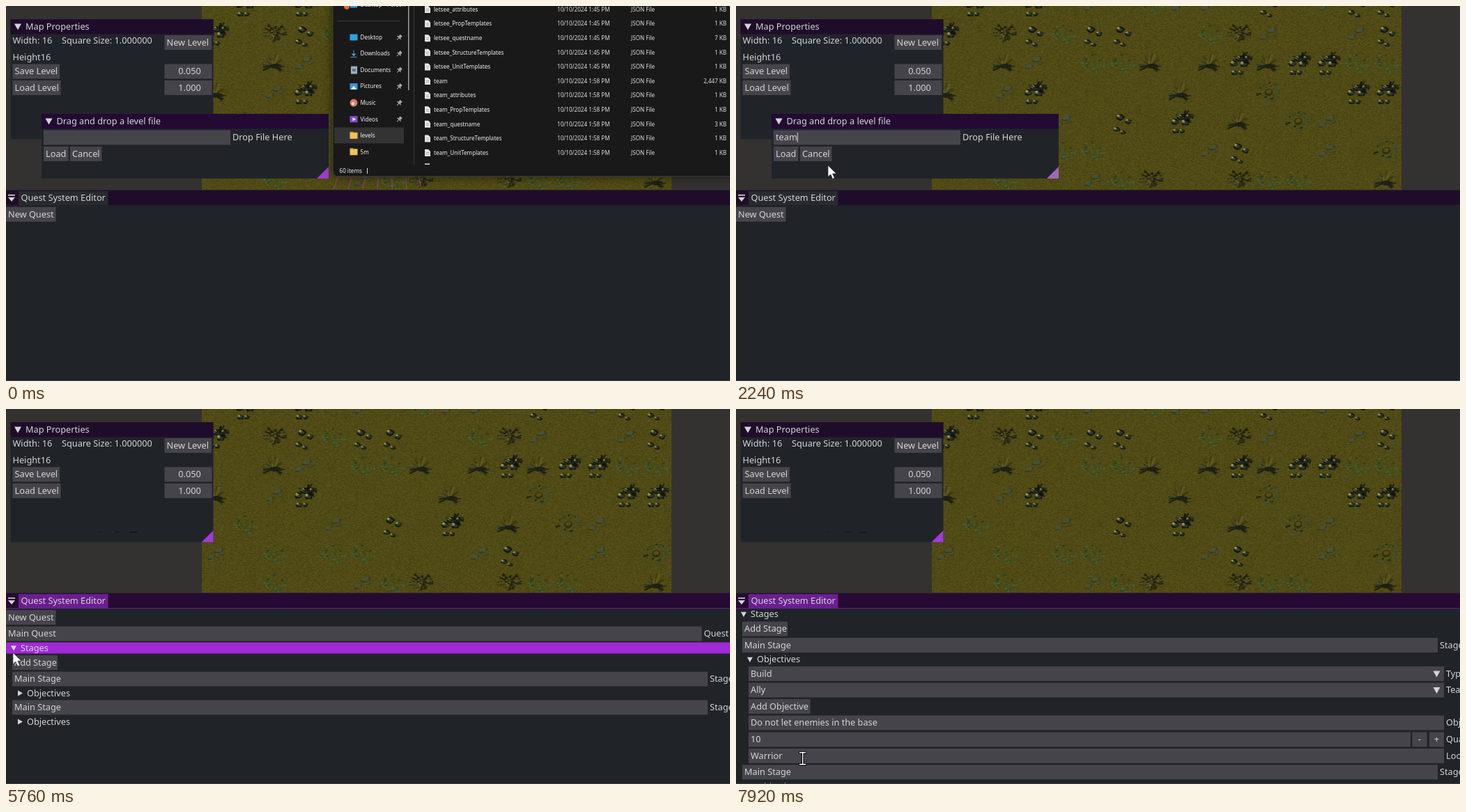
These frames come from a looping animation (1039 px wide and 539 px high, 7990 ms). An HTML page with a canvas:

```html
<!DOCTYPE html>
<html lang="en">
<head>
<meta charset="utf-8">
<title>Level editor</title>
<style>
html, body { margin: 0; width: 100%; height: 100%; overflow: hidden; background: #333230; }
canvas { display: block; }
</style>
</head>
<body>
<canvas id="stage" width="1039" height="539"></canvas>
<script>
const W = 1039, H = 539, LOOP = 7990;
const ctx = document.getElementById('stage').getContext('2d');
const UI_FONT = '12.74px "Noto Sans", "Open Sans", sans-serif';
const FILE_FONT = '8.1px "Noto Sans", "Open Sans", sans-serif';
const FRAME = '#46444b', BODY = '#202429', INK = '#d4d4d5';
const HOT = '#6d1c99', HEADER = '#a02ad6', GRIP = '#a23ad6';

// ---------- helpers ----------
let seed = 1;
const rnd = () => (seed = (seed * 16807) % 2147483647) / 2147483647;
const clamp = v => Math.max(0, Math.min(1, v));

function rect(x, y, w, h, color, c = ctx) {
  c.fillStyle = color;
  c.fillRect(x, y, w, h);
}
function poly(color, pts, c = ctx) {
  c.fillStyle = color;
  c.beginPath();
  for (let i = 0; i < pts.length; i += 2) c.lineTo(pts[i], pts[i + 1]);
  c.closePath();
  c.fill();
}
function blob(x, y, rx, ry, color, c = ctx) {
  c.fillStyle = color;
  c.beginPath();
  c.ellipse(x, y, rx, ry, -0.35, 0, 7);
  c.fill();
}
// text is placed by its left edge and vertical middle
function text(s, x, mid, color = INK, font = UI_FONT, align = 'left') {
  ctx.font = font;
  ctx.textAlign = align;
  ctx.fillStyle = color;
  ctx.fillText(s, x, Math.round(mid + parseFloat(font) * 0.34));
}

// ---------- terrain ----------
const TILE = 42.1, MAP_X = 280.5;
const MAP = [
  '.R.R.p.gpp.r.prr',
  'R.Drgrr..gDp..pr',
  '..Sp.ggS.SRSRRgg',
  'S.pR....S..c..RR',
  '.g..p.r.R.S.cp..',
  'p.g.gg...pr..p.c',
  '..g..pgD..Dgg..S'
];

function jagged(c, x, y, rx, ry, color) {
  const pts = [];
  for (let a = 0; a < 6.2; a += 0.75) {
    const d = 0.65 + rnd() * 0.5;
    pts.push(x + Math.cos(a) * rx * d, y + Math.sin(a) * ry * d);
  }
  poly(color, pts, c);
}
function rock(c, x, y, r) {
  jagged(c, x + 1, y + 1, r * 1.3, r, '#14170e');
  jagged(c, x + r * 0.3, y + r * 0.2, r * 0.8, r * 0.55, '#263b39');
  jagged(c, x - r * 0.3, y - r * 0.2, r * 0.6, r * 0.5, '#6d6834');
  jagged(c, x - r * 0.3, y - r * 0.3, r * 0.35, r * 0.3, '#b0a454');
}
function specks(c, n, rx, ry, colors, hollow = 0) {
  for (let i = 0; i < n; i++) {
    const a = rnd() * 6.28, d = hollow + (1 - hollow) * Math.sqrt(rnd());
    const s = 0.5 + rnd();
    blob(Math.cos(a) * d * rx, Math.sin(a) * d * ry, s * 1.4, s, colors[i % colors.length], c);
  }
}
// short strokes fanning out of one foot point
function fan(c, n, x, y, from, to, len, colors) {
  c.lineWidth = 1.5;
  for (let i = 0; i < n; i++) {
    const a = from + (to - from) * rnd(), d = len * (0.4 + 0.6 * rnd());
    c.strokeStyle = colors[i % colors.length];
    c.beginPath();
    c.moveTo(x + Math.cos(a) * 3, y + Math.sin(a) * 2);
    c.lineTo(x + Math.cos(a) * d, y + Math.sin(a) * d);
    c.stroke();
  }
}
const SPRITES = {
  R(c) {
    c.save();
    c.translate(3, -5);
    specks(c, 30, 15, 9, ['#14170f', '#1d2a25', '#2c3c32']);
    c.restore();
    rock(c, 0, -7, 5); rock(c, 10, -8, 4); rock(c, -9, 0, 5);
    rock(c, 5, 1, 5); rock(c, -8, 13, 4); rock(c, 1, 13, 3);
    fan(c, 14, 4, -4, -3.4, 0.6, 16, ['#12140d', '#1d2118']);
  },
  r(c) { rock(c, -4, -7, 5); rock(c, 8, -1, 4); rock(c, -9, 11, 4); rock(c, 0, 15, 3); },
  S(c) {
    fan(c, 26, -2, 4, -2.6, -0.3, 18, ['#6a602a', '#34330f', '#5a5122', '#453f17']);
    fan(c, 16, -3, 4, -0.1, 0.7, 19, ['#171b10', '#2a3526', '#22240f']);
    fan(c, 10, -2, 4, 2.7, 3.8, 17, ['#1a1d10', '#37360f', '#2b3a2e']);
    jagged(c, -1, 4, 8, 4, '#1d2113');
  },
  D(c) {
    specks(c, 50, 17, 14, ['#1e200f', '#2f2e12', '#5d5523', '#3b3815']);
    fan(c, 18, 0, -2, 0, 6.28, 16, ['#1b1d0e', '#28280f']);
    specks(c, 14, 11, 8, ['#6a602a', '#2c3f35']);
  },
  g(c) { specks(c, 42, 17, 15, ['#2c4f25', '#333c14', '#356447', '#4a6028']); },
  p(c) {
    for (const [x, y, r] of [[4, -5, 7], [-7, 5, 6], [9, 1, 3]]) {
      blob(x, y, r, r * 0.55, '#303a27', c);
      blob(x - 0.6, y - 0.8, r * 0.8, r * 0.38, '#4f5128', c);
      blob(x + 2, y + 1, r * 0.4, r * 0.2, '#365450', c);
    }
  },
  c(c) {
    specks(c, 52, 17, 14, ['#1e2210', '#2f4a28', '#3a5643', '#4c4a1d'], 0.5);
    blob(0, 0, 6, 5, '#2c2e11', c);
    blob(0, -1, 4, 3, '#544d1b', c);
  }
};

function makeTerrain() {
  const cv = document.createElement('canvas');
  cv.width = 674;
  cv.height = 264;
  const c = cv.getContext('2d');
  const img = c.createImageData(674, 264), d = img.data;
  for (let i = 0; i < d.length; i += 4) {
    const n = (rnd() + rnd() - 1) * 16;
    d[i] = 80 + n;
    d[i + 1] = 74 + n;
    d[i + 2] = 22 + n * 0.5;
    d[i + 3] = 255;
  }
  c.putImageData(img, 0, 0);
  MAP.forEach((line, row) => [...line].forEach((k, col) => {
    if (k === '.') return;
    seed = k.charCodeAt(0) * 977;
    c.save();
    c.translate((col + 0.5) * TILE, row * 42 - 2);
    SPRITES[k](c);
    c.restore();
  }));
  return cv;
}
const terrain = makeTerrain();

// ---------- pointer ----------
const PATH = [
  [230, 1050, -20], [400, 640, 110], [560, 230, 172], [710, 124, 181], [800, 124, 181],
  [850, 137, 185], [1050, 137, 185], [1110, 128, 212], [1180, 132, 229], [2980, 132, 229],
  [3400, 84, 212], [3540, 80, 213], [4060, 80, 213], [4400, 45, 290], [4680, 13, 356],
  [4880, 8, 344], [4950, 8, 346], [5430, 8, 346], [5760, 10, 350], [6230, 14, 409],
  [6640, 14, 409], [7100, 45, 390], [7510, 45, 390], [7920, 95, 502], [LOOP, 95, 502]
];
let mouse = { x: -99, y: -99, type: 'arrow' };

function moveMouse(t) {
  mouse = { x: -99, y: -99, type: 'arrow' };
  const i = PATH.findIndex(p => p[0] >= t);
  if (i < 1) return;
  const [t0, x0, y0] = PATH[i - 1], [t1, x1, y1] = PATH[i];
  const k = (t - t0) / (t1 - t0);
  mouse.x = x0 + (x1 - x0) * k;
  mouse.y = y0 + (y1 - y0) * k;
}
const over = (x, y, w, h) =>
  mouse.x >= x && mouse.x < x + w && mouse.y >= y && mouse.y < y + h;

function drawMouse(clicking) {
  const { x, y, type } = mouse;
  if (clicking) {
    ctx.globalAlpha = 0.76;
    blob(x - 1, y, 13, 13, '#d6a832');
    ctx.globalAlpha = 1;
  }
  ctx.save();
  ctx.translate(x, y);
  if (type === 'beam') {
    rect(-5, -10, 11, 4, '#17171a');
    rect(-5, 7, 11, 4, '#17171a');
    rect(-1.5, -9, 4, 18, '#17171a');
    rect(-4, -9, 9, 1.5, '#fff');
    rect(-4, 8, 9, 1.5, '#fff');
    rect(0, -9, 1.3, 18, '#fff');
  } else {
    poly(clicking ? '#fdf0b4' : '#fff',
      [0, 0, 0, 16.5, 3.8, 13, 6.6, 19.5, 9.4, 18.3, 6.7, 12, 12, 12]);
    ctx.strokeStyle = '#25252a';
    ctx.lineWidth = 0.7;
    ctx.stroke();
  }
  ctx.restore();
}

// ---------- widgets, placed by vertical middle ----------
function button(x, mid, w, label) {
  rect(x, mid - 10.5, w, 21, over(x, mid - 10.5, w, 21) ? HOT : FRAME);
  text(label, x + 3, mid);
}
function input(x, mid, w, value, label) {
  rect(x, mid - 10.5, w, 21, FRAME);
  if (over(x, mid - 10.5, w, 21)) mouse.type = 'beam';
  text(value, x + 3, mid);
  text(label, x + w + 3, mid);
}
const arrowDown = (x, y, r = 5) =>
  poly(INK, [x - r, y - r * 0.8, x + r, y - r * 0.8, x, y + r]);
function combo(mid, value, label) {
  const hot = over(18, mid - 10.5, 998, 21);
  rect(18, mid - 10.5, 998, 21, hot ? '#51475a' : FRAME);
  if (hot) rect(995, mid - 10.5, 21, 21, HOT);
  arrowDown(1005.5, mid);
  text(value, 21, mid);
  text(label, 1019, mid);
}
function tree(x, mid, label, open) {
  if (over(x, mid - 8, W, 16)) rect(x, mid - 8, W - x, 16, HEADER);
  if (open) arrowDown(x + 11, mid, 4);
  else poly(INK, [x + 8, mid - 4, x + 15, mid, x + 8, mid + 4]);
  text(label, x + 21, mid);
}
function panel(x, y, w, h, title, bar) {
  rect(x, y, w, h, BODY);
  rect(x, y, w, 21.5, bar);
  arrowDown(x + 10.5, y + 10.5);
  text(title, x + 21.5, y + 10.5);
}
const grip = (x, y, color) => poly(color, [x, y - 17, x, y, x - 17, y]);

// ---------- windows ----------
function mapPanel(focusable) {
  panel(6.5, 19, 291, 172.5, 'Map Properties', '#1f0c2a');
  text('Width: 16', 9.5, 49.5);
  text('Square Size: 1.000000', 80, 49.5);
  text('Height16', 9.5, 73.5);
  button(227.5, 52.5, 67.5, 'New Level');
  button(9.5, 94, 67.5, 'Save Level');
  button(9.5, 117.5, 69, 'Load Level');
  [['0.050', 94], ['1.000', 117.5]].forEach(([v, y]) => {
    rect(227.5, y - 10.5, 68, 21, FRAME);
    text(v, 263.5, y, INK, UI_FONT, 'center');
  });
  if (focusable) {
    rect(132, 176.5, 3, 1, '#121216');
    rect(156, 176.5, 9, 1, '#121216');
    rect(177, 176.5, 11, 1.5, '#121216');
    grip(297.5, 191.5, GRIP);
  }
}

function dropPanel(t) {
  const typed = 'team'.slice(0, [1780, 1980, 2110, 2240].filter(k => t >= k).length);
  panel(51, 155, 412, 93, 'Drag and drop a level file', '#240a33');
  input(54, 189, 268, typed, 'Drop File Here');
  if (t >= 710 && t < 3600) {
    ctx.font = UI_FONT;
    rect(57 + ctx.measureText(typed).width, 182, 1, 14, INK);
  }
  button(54, 212.5, 35.5, 'Load');
  button(92, 212.5, 45.5, 'Cancel');
  grip(463, 248, t < 650 ? GRIP : '#a067bb');
}

function questPanel(t) {
  const loaded = t >= 3720, active = t >= 5150;
  const stages = t >= 5220, goals = t >= 6430, scroll = t >= 7240 ? 48.5 : 0;
  rect(0, 264, W, 275, BODY);
  rect(0, 264, W, 1, '#2a2830');
  rect(0, 265, W, 21, active ? '#260a34' : '#1f0c29');
  if (active) rect(0, 286, W, 1, '#651d87');
  rect(18, 266, 128.5, 20, active || over(18, 266, 128, 20) ? '#6a1f8f' : '#282a30');
  text('Quest System Editor', 21.5, 276);
  rect(3, 271, 10, 1.6, INK);
  poly(INK, [3, 275, 13, 275, 8, 281]);

  ctx.save();
  ctx.beginPath();
  ctx.rect(0, 287, W, 252);
  ctx.clip();
  const at = y => y - scroll;
  button(0, at(299.5), 71.5, 'New Quest');
  if (loaded) {
    input(0, at(323), 998.5, 'Main Quest', 'Quest');
    tree(0, at(343.5), 'Stages', stages);
  }
  if (stages) {
    button(9, at(364.5), 65, 'Add Stage');
    input(9, at(388), 998, 'Main Stage', 'Stage');
    tree(9, at(408.5), 'Objectives', goals);
    const next = at(goals ? 570.5 : 429);
    if (goals) {
      combo(at(429), 'Build', 'Type');
      combo(at(452.5), 'Ally', 'Team');
      button(18, at(476), 88.5, 'Add Objective');
      input(18, at(499.5), 998, 'Do not let enemies in the base', 'Objective');
      input(18, at(523.5), 950, '10', '');
      button(970.5, at(523.5), 21, '');
      button(995, at(523.5), 21, '');
      text('-', 981, at(523.5), INK, UI_FONT, 'center');
      text('+', 1005.5, at(523.5), INK, UI_FONT, 'center');
      text('Quantity', 1019, at(523.5));
      input(18, at(547), 998, 'Warrior', 'Loot');
    }
    input(9, next, 998, 'Main Stage', 'Stage');
    tree(9, next + 20.5, 'Objectives', false);
  }
  ctx.restore();
  rect(0, 538, W, 1, '#3a3a42');
}

// ---------- file browser ----------
const PARTS = ['', '_attributes', '_PropTemplates', '_questname', '_StructureTemplates', '_UnitTemplates'];
const FILES = [...PARTS.slice(1).map(p => 'letsee' + p), ...PARTS.map(p => 'team' + p)];
const PLACES = [
  ['Desktop', '#2ba3e0'], ['Downloads', '#4c9ac4'], ['Documents', '#9eb0bd'], ['Pictures', '#3a94dc'],
  ['Music', '#dd7a5f'], ['Videos', '#8a4ad0'], ['levels', '#efc35a'], ['5m', '#efc35a']
];

function fileIcon(y) {
  poly('#e8e8e8', [601, y - 5, 606, y - 5, 609, y - 2, 609, y + 5, 601, y + 5]);
  rect(602.5, y - 1, 5, 0.8, '#999');
  rect(602.5, y + 1.5, 5, 0.8, '#999');
}
function placeIcon(i, y, color) {
  if (i === 1) {
    rect(498.5, y - 5, 1, 8, color);
    poly(color, [495.5, y, 502.5, y, 499, y + 4]);
    rect(494.5, y + 4.5, 9, 1, color);
  } else if (i === 4) {
    blob(499, y, 5.5, 5.5, color);
    blob(498, y + 1, 2, 2, '#fff');
  } else {
    const tall = i === 2;
    rect(tall ? 495 : 493.5, y - (tall ? 5.5 : 4.5), tall ? 9 : 11, tall ? 11 : 9, color);
    if (tall) rect(497, y - 2, 5, 4, '#5a7284');
    if (i === 3) poly('#fff', [495, y + 4, 499, y - 1, 503, y + 4]);
    if (i === 5) poly('#fff', [497.5, y - 2.5, 502, y, 497.5, y + 2.5]);
    if (i > 5) rect(493.5, y - 5.5, 5, 1.5, '#d79b31');
  }
}
function pin(y) {
  ctx.save();
  ctx.translate(564.5, y);
  ctx.rotate(0.75);
  rect(-2, -4, 4, 4, '#a9a9a9');
  rect(-3.5, 0, 7, 1.2, '#a9a9a9');
  rect(-0.5, 1, 1, 4, '#a9a9a9');
  ctx.restore();
}
function browser(t) {
  const k = clamp((t - 110) / 250);
  if (k >= 1) return;
  const ease = k * k, s = 1 - 0.45 * ease;
  const say = (v, x, y, align, color = '#f0f0f0') => text(v, x, y, color, FILE_FONT, align);
  ctx.save();
  ctx.globalAlpha = 1 - k;
  ctx.translate(750, 500);
  ctx.scale(s, s);
  ctx.translate(-750, -500);
  ctx.beginPath();
  ctx.roundRect(469, -20, 640, 265, 7);
  ctx.shadowColor = 'rgba(0,0,0,.6)';
  ctx.shadowBlur = 14 * (1 - k);
  ctx.fillStyle = '#191919';
  ctx.fill();
  ctx.shadowBlur = 0;
  ctx.strokeStyle = '#454545';
  ctx.lineWidth = 1;
  ctx.stroke();

  rect(585, 0, 1, 228, '#3a3a3a');
  rect(577, 0, 1.5, 121, '#9c9c9c');
  rect(476, 21, 89, 1, '#3a3a3a');
  blob(489, 1, 4, 4, '#e2653a');
  rect(494, 0, 10, 2.5, '#2ba3e0');
  say('Desktop - Person', 508.5, -2);
  rect(471, 174.5, 100, 23, '#333');
  PLACES.forEach(([name, color], i) => {
    const y = 45 + i * 23.55;
    placeIcon(i, y, color);
    say(name, 508.5, y);
    if (i < 6) pin(y);
  });
  FILES.forEach((name, i) => {
    const y = 5 + i * 20.6;
    const size = { letsee_questname: '7', team: '2,447', team_questname: '3' }[name] || '1';
    fileIcon(y);
    say(name, 614, y);
    say(`10/10/2024 1:${i < 5 ? 45 : 58} PM`, 791, y, 'left', '#dedede');
    say('JSON File', 897, y, 'left', '#dedede');
    say(size + ' KB', 1034, y, 'right', '#dedede');
  });
  rect(601, 226.5, 7, 1.5, '#e8e8e8');
  say('60 items', 478.5, 237);
  rect(518, 233, 1, 8, '#ddd');
  ctx.restore();
}

function brush() {
  ctx.strokeStyle = '#93408c';
  ctx.lineWidth = 1;
  for (let i = 0; i < 7; i++) {
    ctx.beginPath();
    ctx.moveTo(476 + i * 19.5, 247);
    ctx.lineTo(470 + i * 21, 263);
    ctx.stroke();
  }
}

// ---------- main loop ----------
function draw(t) {
  moveMouse(t);
  rect(0, 0, W, H, '#333230');
  ctx.drawImage(terrain, MAP_X, 0);
  if (t < 180) brush();
  mapPanel(t >= 3720);
  if (t < 3720) dropPanel(t);
  questPanel(t);
  browser(t);
  const clicking = [[3590, 3720], [5130, 5220], [6360, 6440]].some(([a, b]) => t >= a && t < b);
  drawMouse(clicking);
}

const start = performance.now();
function tick() {
  draw((performance.now() - start) % LOOP);
  requestAnimationFrame(tick);
}
tick();
</script>
</body>
</html>
```
